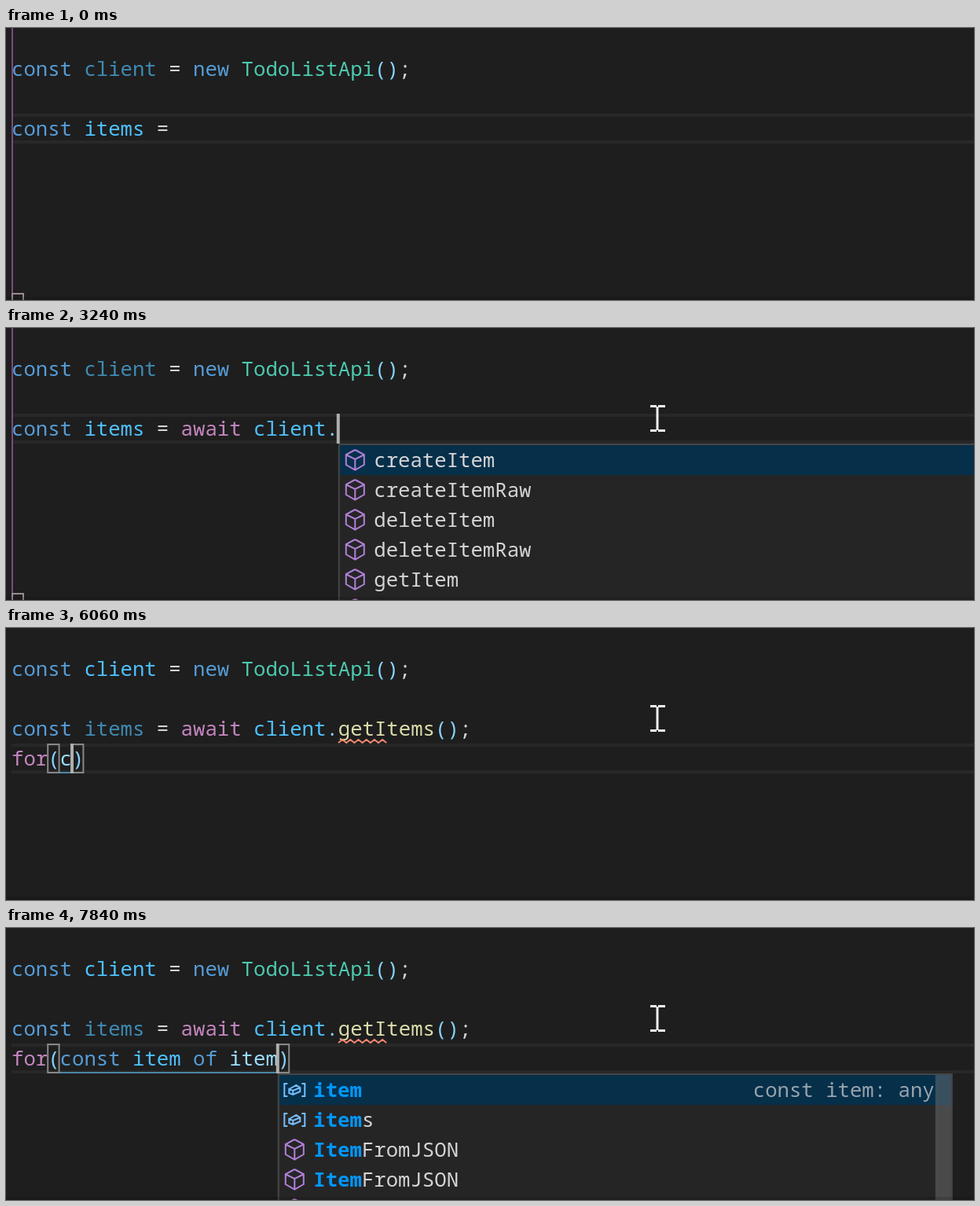
Animation, 1232 px wide and 346 px high, one loop 7.99 s. Source, as an HTML page with a canvas:

```html
<!DOCTYPE html>
<html lang="en">
<head>
<meta charset="utf-8">
<title>Code completion</title>
<style>
  html, body { margin: 0; width: 100%; height: 100%; overflow: hidden; background: #1e1e1e; }
  canvas { display: block; }
</style>
</head>
<body>
<canvas id="stage" width="1232" height="346"></canvas>
<script>
const ctx = document.getElementById('stage').getContext('2d');
const LOOP = 7990, LEFT = 7, CHAR = 15.4, ROW = 38;
const MONO = '25.67px "Noto Sans Mono", monospace';
const BLUE = '#569cd6', BRIGHT = '#4fc1ff', DIM = '#3f8ab3', PURPLE = '#c586c0',
      LIGHT = '#9cdcfe', SKY = '#87d3ff', WHITE = '#d4d4d4';
const WORDS = { const: BLUE, new: BLUE, of: BLUE, await: PURPLE, for: PURPLE,
                TodoListApi: '#4ec9b0', getItems: '#dcdcaa', '=': WHITE, ';': WHITE };

// Completion lists: icon, labels, selected row, optional extras
const MENUS = {
  a: { icon: 'cube', rows: ['access', 'access', 'accessSync', 'addListener', 'addListener', 'all'], thumb: [22, 40] },
  aw: { icon: 'abc', rows: ['await', 'Awaited', 'awaitable', 'awaiting', 'awake', 'aware'] },
  awa: { icon: 'abc', rows: ['await', 'Awaited', 'awaitable'] },
  clie: { icon: 'abc', rows: ['client', 'clientId', 'ClientRequest', 'clients', 'clientWidth', 'clientX'] },
  api: { icon: 'cube', rows: ['createItem', 'createItemRaw', 'deleteItem', 'deleteItemRaw', 'getItem', 'getItemRaw'] },
  get: { icon: 'cube', rows: ['getItem', 'getItemRaw', 'getItems', 'getItemsRaw'], pick: 2,
         detail: ['(method) TodoListApi.get…', 486] },
  fo: { icon: 'abc', rows: ['for', 'forEach', 'format', 'forward', 'found', 'fork'] },
  co: { icon: 'abc', rows: ['const', 'constants', 'constructor', 'construct', 'consts', 'console'] },
  it: { icon: 'abc', rows: ['item', 'itemId', 'items', 'Item', 'ItemId', 'Items'] },
  of: { icon: 'abc', rows: ['of', 'offset', 'offsetX', 'offsetY', 'official', 'offline'] },
  item: { icon: 'cube', rows: ['item', 'items', 'ItemFromJSON', 'ItemFromJSON', 'ItemToJSON'], vars: 2,
          detail: ['const item: any', 605], thumb: [2, 300] }
};

// Time, typed text, menu, columns by which the menu lags the caret
const FIRST = [
  [0, ''], [1530, 'a'], [1700, 'a', 'a'], [1780, 'aw', 'a', 1], [1860, 'aw', 'aw'],
  [2010, 'awa', 'awa'], [2090, 'awai', 'awa'], [2240, 'await', 'awa'], [2320, 'await '],
  [2470, 'await c'], [2550, 'await cl'], [2630, 'await cli'], [2710, 'await clie'],
  [2780, 'await clie', 'clie'], [2870, 'await clien', 'clie'], [2950, 'await client', 'clie'],
  [3090, 'await client.'], [3170, 'await client.', 'api'], [3250, 'await client.g', 'api', 1],
  [3330, 'await client.g', 'get'], [3410, 'await client.ge', 'get'],
  [3480, 'await client.get', 'get', 1], [3560, 'await client.get', 'get'],
  [3780, 'await client.getI', 'get'], [4240, 'await client.getItems'],
  [4410, 'await client.getItems('], [4710, 'await client.getItems()'], [4880, 'await client.getItems();']
];
const SECOND = [
  [5110, ''], [5260, 'f'], [5430, 'f', 'fo'], [5490, 'fo', 'fo'], [5660, 'for', 'fo'], [5810, 'for('],
  [6060, 'for(c'], [6130, 'for(c', 'co'], [6210, 'for(co', 'co'], [6290, 'for(con', 'co'],
  [6370, 'for(cons', 'co'], [6520, 'for(const'], [6600, 'for(const '], [6750, 'for(const i'],
  [6830, 'for(const it', 'it'], [6910, 'for(const ite', 'it'], [6980, 'for(const item', 'it'],
  [7140, 'for(const item '], [7290, 'for(const item o'], [7370, 'for(const item of', 'of'],
  [7450, 'for(const item of '], [7530, 'for(const item of i'], [7700, 'for(const item of it', 'item'],
  [7780, 'for(const item of ite', 'item'], [7840, 'for(const item of item', 'item']
];

const colX = col => LEFT + col * CHAR;
const at = (steps, t) => steps.filter(s => s[0] <= t).pop();

function rect(x, y, w, h, color) {
  ctx.fillStyle = color;
  ctx.fillRect(x, y, w, h);
}

function frame(x, y, w, h, color) {
  ctx.strokeStyle = color;
  ctx.lineWidth = 2;
  ctx.strokeRect(x + 1, y + 1, w - 2, h - 2);
}

function text(str, x, mid, color, font = MONO) {
  ctx.font = font;
  ctx.fillStyle = color;
  ctx.fillText(str, x, mid + 9);
}

function path(color, width, ...lines) {
  ctx.strokeStyle = color;
  ctx.lineWidth = width;
  ctx.beginPath();
  for (const line of lines) {
    for (let i = 0; i < line.length; i += 2) ctx[i ? 'lineTo' : 'moveTo'](line[i], line[i + 1]);
  }
  ctx.stroke();
}

function codeLine(str, mid, dim) {
  let col = 0, prev = '';
  for (const word of str.match(/\w+|\s+|\W/g) || []) {
    let color = WORDS[word] || (/\w/.test(word) ? LIGHT : SKY);
    if (word === 'for' && !str.includes('(')) color = LIGHT;
    if (prev === 'const') color = dim ? DIM : /^ite?$|^i$/.test(word) ? BLUE : BRIGHT;
    if (word === 'client' && str.includes('client.')) color = BRIGHT;
    text(word, colX(col), mid, color);
    col += word.length;
    if (word.trim()) prev = word;
  }
}

const icons = {
  cube(x, y) {
    path('#b180d7', 2,
      [x, y - 13, x + 11.5, y - 7, x + 11.5, y + 6, x, y + 12.5, x - 11.5, y + 6, x - 11.5, y - 7, x, y - 13],
      [x - 11, y - 6.5, x, y - 1, x + 11, y - 6.5], [x, y - 1, x, y + 12]);
  },
  abc(x, y) {
    text('abc', x - 15, y - 3, '#c5c5c5', '18px "Noto Sans", sans-serif');
  },
  variable(x, y) {
    path('#75beff', 2,
      [x - 9, y - 8, x - 13, y - 8, x - 13, y + 8, x - 9, y + 8],
      [x + 9, y - 8, x + 13, y - 8, x + 13, y + 8, x + 9, y + 8],
      [x - 7, y - 1, x + 2, y - 6, x + 7, y - 3, x + 7, y + 2, x - 2, y + 6, x - 7, y + 4, x - 7, y - 1, x - 2, y + 1, x + 7, y - 3],
      [x - 2, y + 1, x - 2, y + 6]);
  }
};

function drawMenu({ icon, rows, pick = 0, vars = 0, detail, thumb }, x, top, typed) {
  const height = rows.length * ROW;
  rect(x, top, 859, height, '#252526');
  rect(x, top + 2 + pick * ROW, 859, ROW, '#062f4a');
  rows.forEach((label, i) => {
    const mid = top + 21 + i * ROW;
    icons[i < vars ? 'variable' : icon](x + 21.5, mid);
    const match = label.toLowerCase().startsWith(typed.toLowerCase()) ? typed.length : 0;
    text(label.slice(0, match), x + 45.5, mid, '#0097fb', 'bold ' + MONO);
    text(label.slice(match), x + 45.5 + match * CHAR, mid, WHITE);
  });
  if (detail) text(detail[0], x + detail[1], top + 21 + pick * ROW, '#97a3ad');
  if (thumb) rect(x + 837, top + thumb[0], 21, thumb[1], 'rgba(121,121,121,.45)');
  frame(x, top, 859, height, '#454545');
}

function brackets(str, top) {
  const open = str.lastIndexOf('('), end = str.length;
  const closed = str.endsWith(')');
  if (open < 0 || (str.includes(')') && !closed)) return false;
  const close = closed ? end - 1 : end;
  if (!closed) rect(colX(open), top + 36, (close - open) * CHAR, 2, '#4b87a8');
  for (const col of [open, close]) frame(colX(col) - 1, top, CHAR + 1, ROW, '#888888');
  return true;
}

function mouse(t) {
  if (t < 140) return;
  const p = Math.min(8, Math.floor((t - 140) / 77.5)) / 8, e = 1 - (1 - p) ** 3;
  const [, x, y] = at([
    [140, 945 - 242 * e, 335 - 232 * e + 16 * p ** 4],
    [990, 709, 133], [1090, 713, 128], [1370, 740, 126], [1450, 800, 119], [1530, 829, 115]
  ], t);
  rect(x - 1.5, y - 15, 3, 30, '#f0f0f0');
  for (const dy of [-17, 14]) {
    rect(x - 9, dy + y, 8, 3, '#f0f0f0');
    rect(x + 1, dy + y, 9, 3, '#f0f0f0');
  }
}

function draw(t) {
  const onSecond = t >= 5110;
  const top = onSecond ? 147 : 109;
  const [, typed, menu, lag = 0] = at(onSecond ? SECOND : FIRST, t);
  const line = (onSecond ? '' : 'const items = ') + typed;
  const unclosed = line.includes('(') && !line.includes(')');
  const shown = line + (unclosed ? ')' : '');
  const caret = colX(line.length);

  rect(0, 0, 1232, 346, '#1e1e1e');
  rect(LEFT, top, 1225, 4, '#282828');
  rect(LEFT, top + 34, 1225, 4, '#282828');
  if (!unclosed || (t >= 5810 && t < 5900)) rect(LEFT, 0, 2, 346, '#7b4a7e');

  codeLine('const client = new TodoListApi();', 52, t < 4240);
  codeLine(onSecond ? 'const items = await client.getItems();' : shown, 128, t >= 4880);
  if (onSecond) codeLine(shown, 166);

  if (t >= 4560) {
    const zigzag = [];
    for (let i = 0; i <= 12; i++) zigzag.push(423 + i * 5.1, i % 2 ? 142 : 146);
    path('#f48771', 2, zigzag);
  }
  if (!brackets(line, top) && !onSecond) {
    frame(LEFT, 337, 16, ROW, '#9a8a96');
    text('}', colX(0), 356, PURPLE);
    text(')', colX(1), 356, WHITE);
  }
  if (t >= 1530 || (t >= 990 && t < 1450)) rect(caret - 2, top, 4, ROW, '#aeafad');
  if (menu) {
    const word = line.match(/\w*$/)[0];
    drawMenu(MENUS[menu], colX(line.length - lag), top + ROW, word.slice(0, word.length - lag));
  }
  rect(0, 342, 1232, 4, 'rgba(0,0,0,.15)');
  mouse(t);
}

function tick() {
  draw(performance.now() % LOOP);
  requestAnimationFrame(tick);
}
tick();
</script>
</body>
</html>
```
